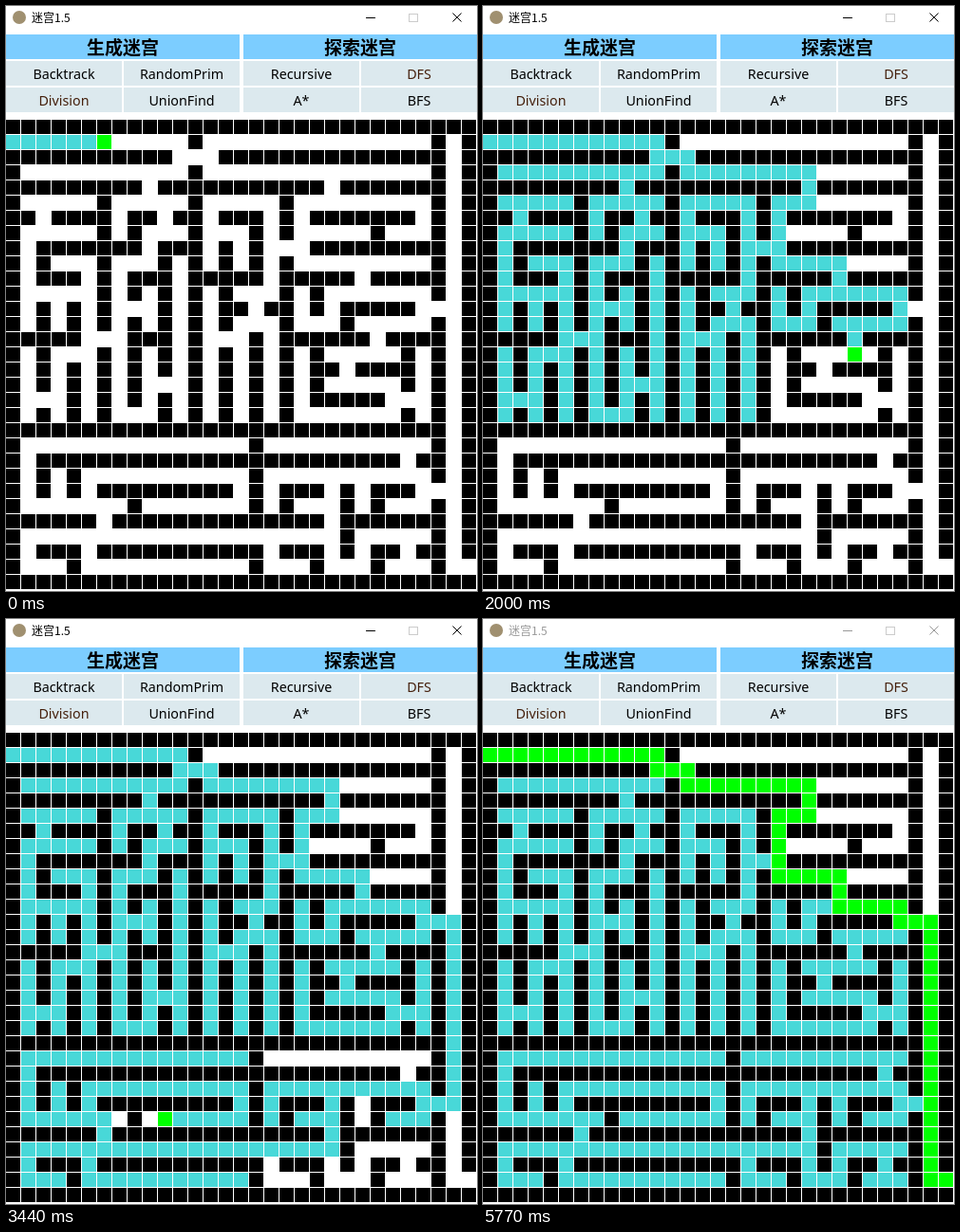
Animation of 496 by 617 pixels, one loop 5870 ms. Source, as an HTML page with a canvas:

```html
<!DOCTYPE html>
<html lang="zh">
<head>
<meta charset="utf-8">
<style>
html, body { margin: 0; width: 100%; height: 100%; overflow: hidden; background: #fff; }
svg, canvas { position: absolute; left: 0; top: 0; }
canvas { top: 120px; }
text { font: 14.3px "Noto Sans", "Noto Sans CJK SC", sans-serif; }
.title, .head { font-family: "Noto Sans CJK SC", "Noto Sans CJK", sans-serif; }
.title { font-size: 12px; }
.head { font-size: 19px; font-weight: bold; }
#chrome { color: #000; }
#chrome.idle { color: #999; }
</style>
</head>
<body>
<svg id="ui" width="496" height="120">
  <circle cx="14" cy="12" r="7" fill="#a09070"/>
  <g id="chrome">
    <text class="title" x="27" y="17" fill="currentColor">迷宫1.5</text>
    <path d="M379 12.5h10M470.5 7.5l9 9M479.5 7.5l-9 9" stroke="currentColor"/>
  </g>
  <rect x="424.5" y="8.5" width="9" height="8" fill="none" stroke="#ccc"/>
</svg>
<canvas id="board" width="496" height="497"></canvas>
<script>
const SIZE = 31, STEP = 16, LOOP = 5870, IDLE_AT = 5770;
const TEAL = '#48d8d8', GREEN = '#0f0';

const wall = '#'.repeat(SIZE);
const maze = [
  wall,
  '............#...............#.#',
  '###########...###############.#',
  '#...........#...............#.#',
  '#########.###########.#######.#',
  '#.....#.....#.....#.........#.#',
  '##.####.##.##.###.#.#######.#.#',
  '#.....#.#...#...#.#.....#...#.#',
  '#.#######.###.#.#...#########.#',
  '#.#...#...#.#.#.#.#.........#.#',
  '#.###.#.###.#####.#####.#####.#',
  '#.....#.#.#.#.#...#.#.......#.#',
  '#.#.#.#...#.#.##.##.#.#####...#',
  '#.#.#.#.#.#.#.#...#...#.....#.#',
  '#####...###.#...#.######.####.#',
  '#.#...#.#.#.#.#.#.#.#.....#.#.#',
  '#.#.#.#.#.#.#.#.#.#.##.####.#.#',
  '#.#.#.#.#...#.#.#.#.#.....#.#.#',
  '#...#.#.#.#.#.#.#.#.#####...#.#',
  '#.#.#.#...#.#.#.#.#.......#.#.#',
  '#############################.#',
  '#...............#...........#.#',
  '#.########################.##.#',
  '#.#.#...........#...........#.#',
  '#.#.#.#########.#.###.#.###...#',
  '#.......#.......#.#...#.#...#.#',
  '######.##############.#######.#',
  '#.....................#.....#.#',
  '#.###.###########.###.#.##.##.#',
  '#...#...........#...#...#...#..',
  wall
];

// Depth-first search: cells in visiting order, and the way back from the exit
const visited = [], route = [], seen = new Set();
function search(x, y) {
  const key = y * SIZE + x;
  if (maze[y]?.[x] !== '.' || seen.has(key)) return false;
  seen.add(key);
  visited.push([x, y]);
  const found = (x === 30 && y === 29) ||
    search(x - 1, y) || search(x, y + 1) || search(x + 1, y) || search(x, y - 1);
  if (found) route.push([x, y]);
  return found;
}
search(0, 1);

const ui = document.getElementById('ui');
function button(label, x, y, w, fill, ink = '#000', cls = '') {
  const base = y + (cls ? 21 : 19);
  ui.insertAdjacentHTML('beforeend',
    `<rect x="${x}" y="${y}" width="${w}" height="26" fill="${fill}"/>` +
    `<text class="${cls}" x="${x + w / 2}" y="${base}" text-anchor="middle" fill="${ink}">${label}</text>`);
}
const columns = [0, 124, 250, 374];
button('生成迷宫', 0, 30, 246, '#7ccdff', '#000', 'head');
button('探索迷宫', 250, 30, 246, '#7ccdff', '#000', 'head');
['Backtrack', 'RandomPrim', 'Recursive', 'DFS', 'Division', 'UnionFind', 'A*', 'BFS']
  .forEach((label, i) => button(label, columns[i % 4], i < 4 ? 58 : 86, 122, '#dce9ee',
    /^D/.test(label) ? '#45200c' : '#000'));

const ctx = document.getElementById('board').getContext('2d');
function cell([x, y], color) {
  ctx.fillStyle = color;
  ctx.fillRect(x * STEP, y * STEP, STEP - 1, STEP - 1);
}

// Nine ticks a second, alternately 120 and 100 ms long
function tickAt(t) {
  const u = t % 2000 - 120, pair = Math.floor(u / 220);
  const tick = 1 + 2 * pair + (u - pair * 220 >= 120 ? 1 : 0);
  return 18 * Math.floor(t / 2000) + Math.max(0, tick);
}

function draw(t) {
  const tick = tickAt(t);
  const count = Math.min(visited.length, Math.floor(7.6 + 11.42 * tick));
  ctx.clearRect(0, 0, 496, 497);
  maze.forEach((row, y) => [...row].forEach((c, x) => c === '#' && cell([x, y], '#000')));
  visited.slice(0, count).forEach(p => cell(p, TEAL));
  cell(visited[count - 1], GREEN);
  route.slice(0, Math.max(0, 5 * tick - 173)).forEach(p => cell(p, GREEN));
  document.getElementById('chrome').classList.toggle('idle', t >= IDLE_AT);
}

const start = performance.now();
function loop() {
  draw((performance.now() - start) % LOOP);
  requestAnimationFrame(loop);
}
loop();
</script>
</body>
</html>
```
